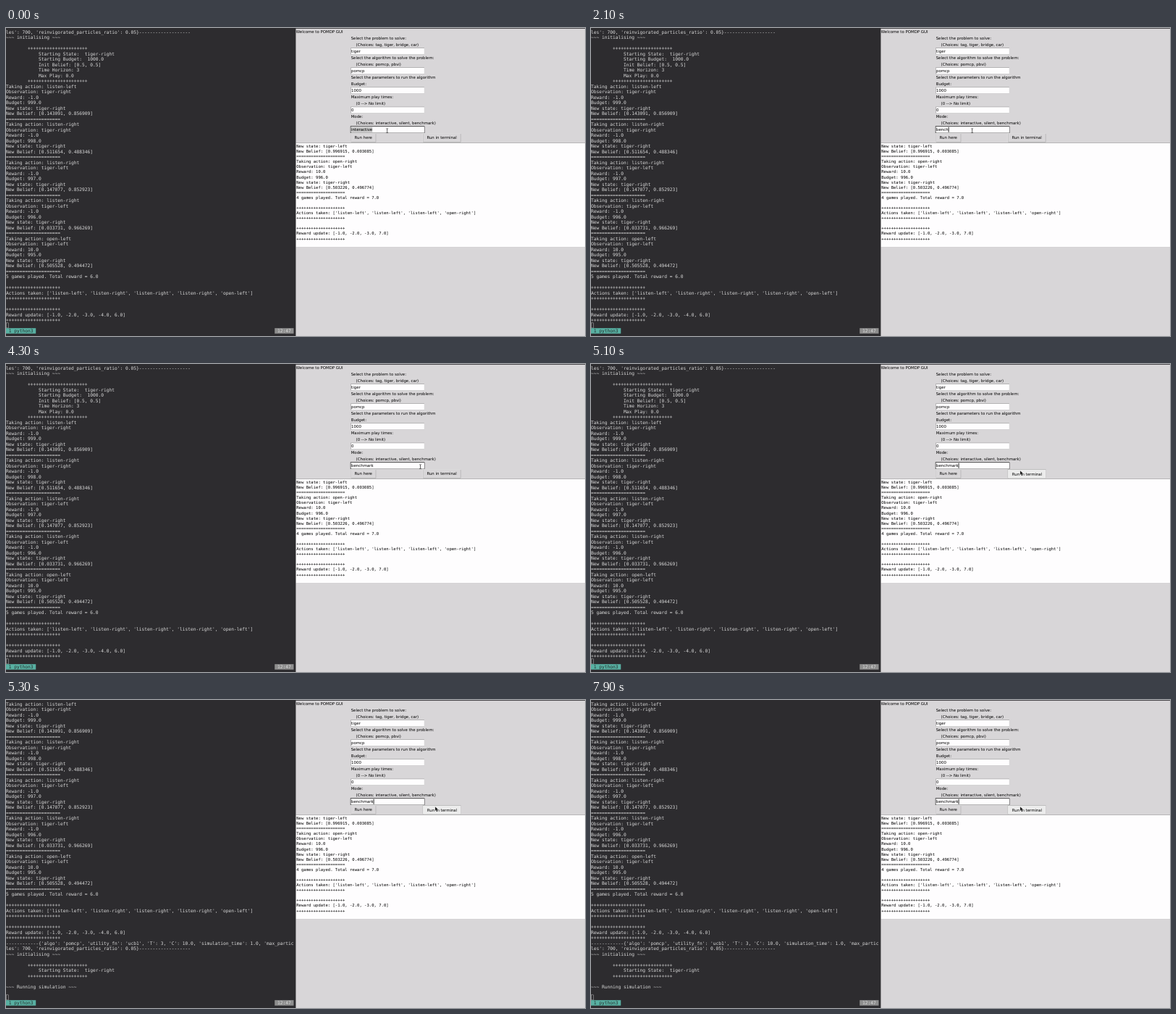
Animation, 800 px wide and 425 px high, one loop 8000 ms. Source, as an HTML page:

```html
<!DOCTYPE html>
<html lang="en">
<head>
<meta charset="utf-8">
<title>POMDP GUI</title>
<style>
  html, body { margin: 0; width: 100%; height: 100%; overflow: hidden; background: #d8d6d8; }
  svg { display: block; width: 800px; height: 425px; }
  text { white-space: pre; text-rendering: geometricPrecision; }
  .term { font: 15px "DejaVu Sans Mono", monospace; letter-spacing: -.03px; fill: #dadada; }
  .log { font: 13.36px "DejaVu Sans Mono", monospace; fill: #000; }
  .ui { font: 13px "DejaVu Sans", sans-serif; fill: #000; }
</style>
</head>
<body>
<svg id="stage" viewBox="0 0 1920 1020" xmlns="http://www.w3.org/2000/svg">
  <clipPath id="rows"><rect x="0" y="4" width="960" height="972"/></clipPath>
</svg>
<script>
const LOOP = 8000, TICK = 100, ROW = 18, TOP = 4;
const DARK = '#2d2c2f', FACE = '#d8d6d8', SHADE = '#828282', PAPER = '#fefdfe';
const stage = document.getElementById('stage');

function add(parent, tag, attrs, content) {
  const el = document.createElementNS('http://www.w3.org/2000/svg', tag);
  for (const key in attrs) el.setAttribute(key, attrs[key]);
  if (content !== undefined) el.textContent = content;
  parent.appendChild(el);
  return el;
}
const rect = (x, y, width, height, fill, parent = stage) =>
  add(parent, 'rect', { x, y, width, height, fill });
const text = (x, y, cls, content, parent = stage) =>
  add(parent, 'text', { x, y, class: cls, 'xml:space': 'preserve' }, content);

// Shared text blocks
const plus = '+'.repeat(20), rule = '='.repeat(20);
const banner = ' '.repeat(8) + '+'.repeat(22), indent = ' '.repeat(12);
const step = (action, seen, reward, budget, belief) => [
  'Taking action: ' + action, 'Observation: tiger-' + seen, 'Reward: ' + reward,
  'Budget: ' + budget, 'New state: tiger-right', `New Belief: [${belief}]`, rule];
const summary = (games, total, actions, rewards) => [
  `${games} games played. Total reward = ${total}`, '',
  plus, `Actions taken: [${actions.map(a => `'${a}'`).join(', ')}]`, plus, '',
  plus, `Reward update: [${rewards}]`, plus];
const start = [
  "les': 700, 'reinvigorated_particles_ratio': 0.05}" + '-'.repeat(19),
  '~~~ initialising ~~~', '', banner, indent + 'Starting State:  tiger-right'];

// Terminal
rect(0, 0, 960, 1020, DARK);
const view = add(stage, 'g', { 'clip-path': 'url(#rows)' });
const scroller = add(view, 'g', {});
[
  ...start,
  indent + 'Starting Budget:  1000.0',
  indent + 'Init Belief: [0.5, 0.5]',
  indent + 'Time Horizon: 3',
  indent + 'Max Play: 0.0',
  banner,
  ...step('listen-left', 'right', '-1.0', '999.0', '0.143091, 0.856909'),
  ...step('listen-right', 'right', '-1.0', '998.0', '0.511654, 0.488346'),
  ...step('listen-right', 'left', '-1.0', '997.0', '0.147077, 0.852923'),
  ...step('listen-right', 'left', '-1.0', '996.0', '0.033731, 0.966269'),
  ...step('open-left', 'left', '10.0', '995.0', '0.505528, 0.494472'),
  ...summary(5, '6.0',
    ['listen-left', 'listen-right', 'listen-right', 'listen-right', 'open-left'],
    '-1.0, -2.0, -3.0, -4.0, 6.0'),
  '-'.repeat(12) + "{'algo': 'pomcp', 'utility_fn': 'ucb1', 'T': 3, 'C': 10.0, 'simulation_time': 1.0, 'max_partic",
  ...start, banner, '', '~~~ Running simulation ~~~'
].forEach((line, i) => line && text(0, TOP + 14 + i * ROW, 'term', line, scroller));

add(stage, 'rect', { x: .5, y: TOP + 54 * ROW + .5, width: 8, height: 17,
  fill: 'none', stroke: '#dadada', 'stroke-width': 1 });
const barY = TOP + 55 * ROW;
rect(0, barY, 99, ROW, '#58b0a2');
text(9, barY + 14, 'term', '1 python3').style.fill = '#26302f';
rect(891, barY, 63, ROW, '#8e8e8e');
text(900, barY + 14, 'term', '12:47').style.fill = '#dcdcdc';

// Form window with its dark frame
rect(960, 0, 960, 1020, DARK);
rect(961, 2, 959, 1018, FACE);
text(962, 17, 'ui', 'Welcome to POMDP GUI');
const LEFT = 1142, FIELD_W = 246, TEXT_X = LEFT + 3;
let y = 23;
const label = s => { text(LEFT + 2, y + 15, 'ui', s); y += 21; };
const note = s => label('    ' + s);
function field(value, focused) {
  if (focused) rect(LEFT, y, FIELD_W, 23, '#000');
  rect(LEFT + 1, y + 1, FIELD_W - 2, 21, SHADE);
  rect(LEFT + 2, y + 2, FIELD_W - 3, 20, PAPER);
  const mark = focused && rect(TEXT_X, y + 3, 70, 17, '#c3c3c3');
  const el = text(TEXT_X, y + 16, 'ui', value);
  const caret = focused && rect(TEXT_X, y + 3, 2, 17, '#000');
  y += 23;
  return { el, mark, caret };
}
label('Select the problem to solve:');
note('(Choices: tag, tiger, bridge, car)');
field('tiger');
label('Select the algorithm to solve the problem:');
note('(Choices: pomcp, pbvi)');
field('pomcp');
label('Select the parameters to run the algorithm');
label('Budget:');
field('1000');
label('Maximum play times:');
note('(0 --> No limit)');
field('0');
label('Mode:');
note('(Choices: interactive, silent, benchmark)');
const mode = field('interactive', true);

function button(x, width, caption) {
  const light = rect(x + 1, y + 1, width - 2, 29, PAPER);
  const dark = rect(x + 2, y + 2, width - 3, 28, SHADE);
  const face = rect(x + 2, y + 2, width - 4, 27, FACE);
  const el = text(x + width / 2, y + 20, 'ui', caption);
  el.setAttribute('text-anchor', 'middle');
  return { light, dark, face, el };
}
button(LEFT, 86, 'Run here');
const run = button(1381, 128, 'Run in terminal');

// Output log
rect(961, 380, 959, 345, SHADE);
rect(962, 381, 958, 344, PAPER);
[
  'New state: tiger-left', 'New Belief: [0.996915, 0.003085]', rule,
  ...step('open-right', 'left', '10.0', '996.0', '0.503226, 0.496774'),
  ...summary(4, '7.0', ['listen-left', 'listen-left', 'listen-left', 'open-right'],
    '-1.0, -2.0, -3.0, 7.0')
].forEach((line, i) => line && text(963, 396 + i * 17, 'log', line));

// Pointers, each with its hot spot at 0,0
const beam = add(stage, 'path', { d: 'M-3-7H-1L0-6L1-7H3M0-6V6M-3 7H-1L0 6L1 7H3',
  fill: 'none', stroke: '#000', 'stroke-width': 1.5 });
const arrow = add(stage, 'path', { d: 'M0 0V15L3.6 11.6L6.2 17.4L9 16.2L6.4 10.6H11Z',
  fill: '#000', stroke: '#fff', 'stroke-width': 1 });

// Timeline
const WORD = 'benchmark';
const KEYS = [1000, 1200, 1600, 1800, 2000, 2300, 2400, 2600, 2800];
const HOVER = 4700, PRESS = 5100;
const SCROLL = [[0, 0], [5200, 3], [5300, 10]];
const PATH = [[0, 1264, 340], [3000, 1264, 340], [3900, 1374, 340],
              [4400, 1374, 340], [4800, 1423, 353], [LOOP, 1423, 353]];

function pointerAt(t) {
  const i = PATH.findIndex(p => p[0] > t);
  const [t0, x0, y0] = PATH[i - 1], [t1, x1, y1] = PATH[i];
  const u = (t - t0) / (t1 - t0), e = u * u * (3 - 2 * u);
  return [x0 + (x1 - x0) * e, y0 + (y1 - y0) * e];
}
const show = (el, on) => el.setAttribute('visibility', on ? 'visible' : 'hidden');

function draw(t) {
  const typed = KEYS.filter(k => k <= t).length;
  mode.el.textContent = typed ? WORD.slice(0, typed) : 'interactive';
  show(mode.mark, !typed);

  // The caret blinks 600 ms on, 300 ms off, restarting on each key
  const since = t - (typed ? KEYS[typed - 1] : 400);
  show(mode.caret, t >= PRESS || (since >= 0 && since % 900 < 600));
  mode.caret.setAttribute('x', TEXT_X + mode.el.getComputedTextLength());

  const [px, py] = pointerAt(t);
  const inField = px < LEFT + FIELD_W;
  for (const p of [beam, arrow]) p.setAttribute('transform', `translate(${px} ${py})`);
  show(beam, inField);
  show(arrow, !inField);

  const pressed = t >= PRESS;
  run.face.setAttribute('fill', t >= HOVER ? '#ececec' : FACE);
  run.light.setAttribute('fill', pressed ? SHADE : PAPER);
  run.dark.setAttribute('fill', pressed ? PAPER : SHADE);
  run.el.setAttribute('transform', pressed ? 'translate(1 1)' : '');

  const lines = SCROLL.filter(s => s[0] <= t).pop()[1];
  scroller.setAttribute('transform', `translate(0 ${-lines * ROW})`);
}

const origin = performance.now();
let last = -1;
function frame() {
  const t = Math.floor((performance.now() - origin) % LOOP / TICK) * TICK;
  if (t !== last) draw(last = t);
  requestAnimationFrame(frame);
}
frame();
</script>
</body>
</html>
```
